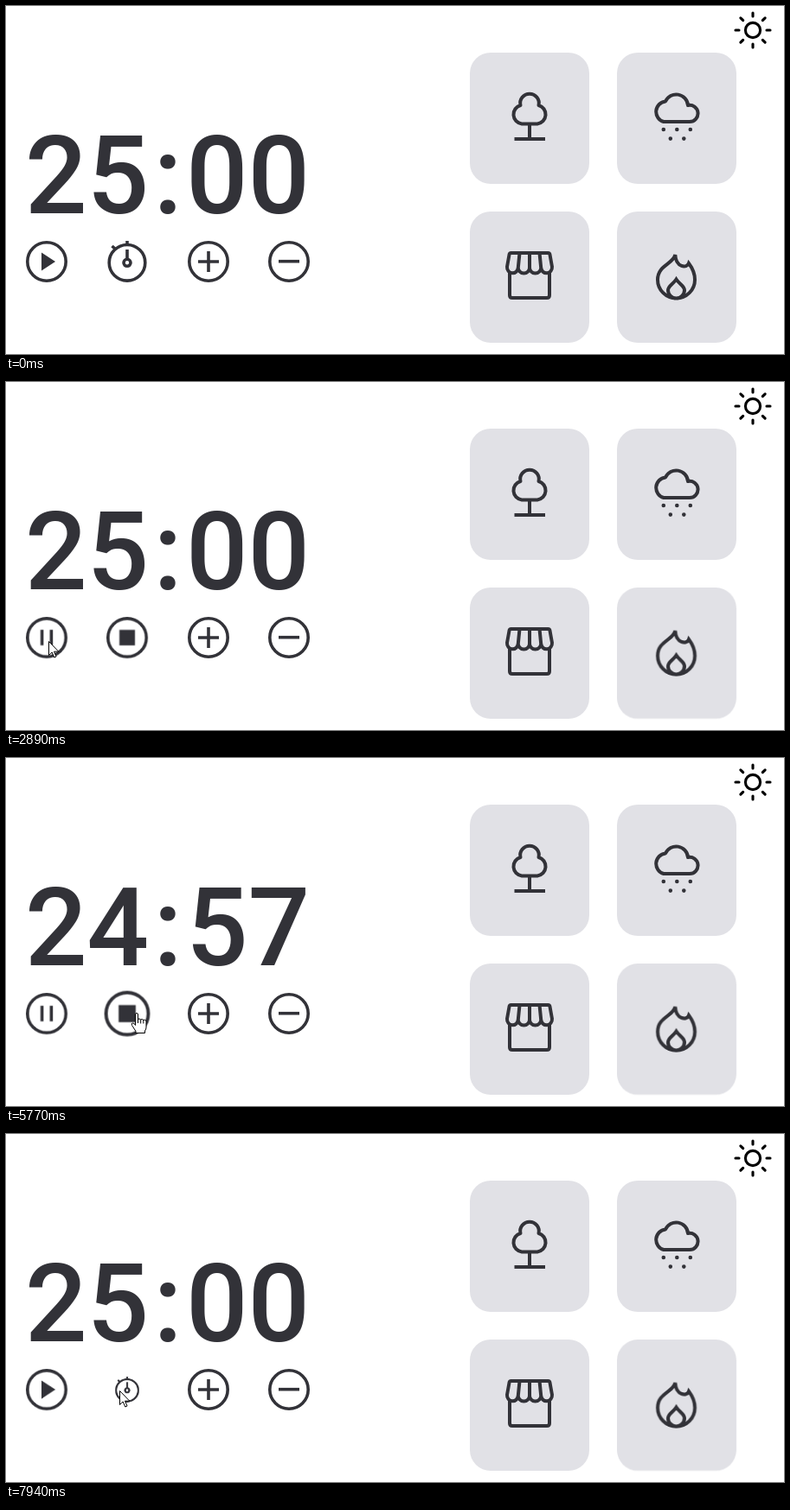
Animation of 899x403 px, one loop 8 s. Source, as an HTML page:

```html
<!DOCTYPE html>
<html lang="en">
<head>
<meta charset="utf-8">
<title>Focus timer</title>
<style>
html, body { margin: 0; width: 100%; height: 100%; overflow: hidden; background: #fff; }
svg { display: block; width: 899px; height: 403px; }
text { font: 500 126px Roboto, sans-serif; fill: #323238; }

.line { fill: none; stroke: #323238; stroke-width: 4; stroke-linejoin: round; }
.thin { stroke-width: 3.6; stroke-linejoin: miter; }
.solid { fill: #323238; }
.card { fill: #e1e1e6; }
.sun { fill: none; stroke: #000; stroke-width: 3.1; stroke-linecap: round; }
.pointer { fill: #fff; stroke: #000; stroke-linejoin: round; }
.beam { fill: none; stroke: #fff; mix-blend-mode: difference; }

/* One shared 8 s loop */
.loop { animation: 8s linear infinite; }
.step { animation: 8s step-end infinite; }

/* Counter */
.s00 { animation-name: s00; }
.s59 { animation-name: s59; }
.s58 { animation-name: s58; }
.s57 { animation-name: s57; }
.s56 { animation-name: s56; }
@keyframes s00 { 0%, 98.5% { opacity: 1 } 46.875%, 100% { opacity: 0 } }
@keyframes s59 { 0%, 59.5%, 100% { opacity: 0 } 46.875% { opacity: 1 } }
@keyframes s58 { 0%, 72%, 100% { opacity: 0 } 59.5% { opacity: 1 } }
@keyframes s57 { 0%, 84.625%, 100% { opacity: 0 } 72% { opacity: 1 } }
@keyframes s56 { 0%, 98.5%, 100% { opacity: 0 } 84.625% { opacity: 1 } }

/* Swapped button icons */
.play { animation-name: play; }
.pause { animation-name: pause; }
.watch { animation-name: watch; }
.stop { animation-name: stop; }
@keyframes play { 0%, 85.5%, 100% { opacity: 1 } 33.375% { opacity: 0 } }
@keyframes pause { 0%, 85.5%, 100% { opacity: 0 } 33.375% { opacity: 1 } }
@keyframes watch { 0%, 98.5%, 100% { opacity: 1 } 33.375% { opacity: 0 } }
@keyframes stop { 0%, 98.5%, 100% { opacity: 0 } 33.375% { opacity: 1 } }

/* Hover growth and pop-in */
.first { animation-name: first; }
.second { animation-name: second; }
@keyframes first {
  0%, 21.5% { transform: scale(1) }
  23.75%, 33.374% { transform: scale(1.1) }
  33.375% { transform: scale(0) }
  35.875%, 45.5% { transform: scale(1) }
  47.25%, 51.625% { transform: scale(1.1) }
  53.375%, 79.125% { transform: scale(1) }
  81%, 85.499% { transform: scale(1.1) }
  85.5% { transform: scale(0) }
  88%, 100% { transform: scale(1) }
}
@keyframes second {
  0%, 33.374% { transform: scale(1) }
  33.375% { transform: scale(0) }
  35.875%, 56.875% { transform: scale(1) }
  59.25%, 76.25% { transform: scale(1.1) }
  78%, 92.125% { transform: scale(1) }
  94.25%, 98.499% { transform: scale(1.1) }
  98.5% { transform: scale(0) }
  99.25% { transform: scale(.61) }
  100% { transform: scale(.95) }
}
.fire { transform-origin: 775px 314px; animation-name: fire; }
@keyframes fire {
  0%, 5.7% { transform: scale(1) }
  6.625%, 8.5% { transform: scale(1.05) }
  10.375%, 100% { transform: scale(1) }
}

/* Mouse */
.mouse { animation-name: mouse; }
@keyframes mouse {
  0%, 6% { transform: translate(775px, 380px) }
  6.625%, 8.4% { transform: translate(693px, 300px) }
  8.625% { transform: translate(676px, 286px) }
  10.625% { transform: translate(470px, 222px) }
  12.5% { transform: translate(345px, 214px) }
  15% { transform: translate(215px, 212px) }
  16.625% { transform: translate(150px, 214px) }
  18.375% { transform: translate(102px, 225px) }
  19.25% { transform: translate(84px, 245px) }
  20% { transform: translate(72px, 262px) }
  21.75% { transform: translate(60px, 276px) }
  23.5% { transform: translate(51px, 296px) }
  24.375% { transform: translate(49px, 299px) }
  26.125%, 45.125% { transform: translate(49px, 300px) }
  46.25% { transform: translate(55px, 300px) }
  50% { transform: translate(70px, 298px) }
  51.875% { transform: translate(78px, 300px) }
  55.25% { transform: translate(106px, 298px) }
  56.125% { transform: translate(108px, 298px) }
  57.5% { transform: translate(130px, 296px) }
  58.875% { transform: translate(148px, 295px) }
  61.375%, 74.5% { transform: translate(151px, 295px) }
  76.625% { transform: translate(115px, 298px) }
  79.125% { transform: translate(72px, 298px) }
  81.375%, 85.5% { transform: translate(52px, 297px) }
  88% { transform: translate(58px, 296px) }
  89.625% { transform: translate(73px, 296px) }
  91.625% { transform: translate(113px, 292px) }
  94.125% { transform: translate(128px, 285px) }
  95%, 97.4% { transform: translate(129px, 284px) }
  97.5%, 98.4% { transform: translate(126px, 284px) }
  99.25%, 100% { transform: translate(131px, 297px) }
}
.arrow { animation-name: arrow; }
.beam { animation-name: beam; }
.hand { animation-name: hand; }
@keyframes arrow {
  0%, 12.5%, 21%, 45.625%, 57.25%, 79.125%, 87.25%, 91.625%, 100% { opacity: 0 }
  5.875%, 19.125%, 33.375%, 51.875%, 76.625%, 85.5%, 89.875%, 98.5% { opacity: 1 }
}
@keyframes beam { 0%, 19.125%, 100% { opacity: 0 } 12.5% { opacity: 1 } }
@keyframes hand {
  0%, 33.375%, 51.875%, 76.625%, 85.5%, 89.875%, 98.5%, 100% { opacity: 0 }
  21%, 45.625%, 57.25%, 79.125%, 87.25%, 91.625% { opacity: 1 }
}
</style>
</head>
<body>
<svg viewBox="0 0 899 403">
  <defs>
    <circle id="ring" class="line thin" r="22.2"/>
    <rect id="tile" class="card" width="138" height="152" rx="24"/>
    <path id="rays" d="M0-20V-16M0 16V20"/>
  </defs>
  <rect width="899" height="403" fill="#fff"/>

  <g class="sun" transform="translate(863 28)">
    <circle r="8.6"/>
    <use href="#rays"/>
    <use href="#rays" transform="rotate(45)"/>
    <use href="#rays" transform="rotate(90)"/>
    <use href="#rays" transform="rotate(135)"/>
  </g>

  <!-- Sound cards -->
  <g>
    <use href="#tile" x="536" y="54"/>
    <path class="line" d="M596 136.5A11 11 0 0 1 594.5 115A10.8 10.8 0 1 1 615.5 115A11 11 0 0 1 614 136.5ZM605 137V154M587.5 154H623"/>
  </g>
  <g>
    <use href="#tile" x="706" y="54"/>
    <path class="line" d="M760 134A12 12 0 0 1 762 110.5A13.6 13.6 0 0 1 788 115A9.6 9.6 0 1 1 790 134Z"/>
    <path class="line" stroke-linecap="round" style="stroke-width:4.6" d="M759.8 143h.01M775.3 143h.01M790.8 143h.01M767.8 153.6h.01M783.3 153.6h.01"/>
  </g>
  <g>
    <use href="#tile" x="536" y="238"/>
    <path class="line" d="M583.5 286H626.5Q628 286 628.4 287.5L631 302A6.4 6.8 0 0 1 618.2 303A6.6 6.6 0 0 1 605 303A6.6 6.6 0 0 1 591.8 303A6.4 6.8 0 0 1 579 302L581.6 287.5Q582 286 583.5 286ZM593.5 286L591.8 303M605 286V303M616.5 286L618.2 303M582 308V335Q582 338 585 338H625Q628 338 628 335V308"/>
  </g>
  <g class="loop fire">
    <use href="#tile" x="706" y="238"/>
    <path class="line" style="stroke-linejoin:miter" d="M773.3 288C771 299 753 300 753 317A21.5 21.5 0 0 0 796 317C796 309 792 302 789 298C787 304 774 303 773.3 288ZM774.5 316.5C771 322 765 324 765 329A9.5 9.5 0 0 0 784 329C784 324 778 322 774.5 316.5Z"/>
  </g>

  <!-- Clock -->
  <text x="187" y="240" text-anchor="middle">:</text>
  <g class="step s00"><text x="22" y="240">25</text><text x="208" y="240">00</text></g>
  <g class="step s59"><text x="22" y="240">24</text><text x="208" y="240">59</text></g>
  <g class="step s58"><text x="22" y="240">24</text><text x="208" y="240">58</text></g>
  <g class="step s57"><text x="22" y="240">24</text><text x="208" y="240">57</text></g>
  <g class="step s56"><text x="22" y="240">24</text><text x="208" y="240">56</text></g>

  <!-- Controls -->
  <g transform="translate(47 296)"><g class="loop first">
    <use href="#ring"/>
    <path class="solid step play" d="M-6-10.5V10.5L10 0Z"/>
    <path class="line thin step pause" d="M-5.4-9V9M5.4-9V9"/>
  </g></g>
  <g transform="translate(140 296)"><g class="loop second">
    <g class="step watch">
      <path class="line thin" d="M0-24V-19M-17.5-18L-13-14M0-14V-3"/>
      <circle class="line thin" cy="1.3" r="20.8"/>
      <circle class="line thin" cy="1.3" r="4"/>
    </g>
    <g class="step stop">
      <use href="#ring"/>
      <rect class="solid" x="-9" y="-9" width="18" height="18"/>
    </g>
  </g></g>
  <g transform="translate(234 296)">
    <use href="#ring"/>
    <path class="line thin" d="M-12 0H12M0-12V12"/>
  </g>
  <g transform="translate(327 296)">
    <use href="#ring"/>
    <path class="line thin" d="M-12-.3H12"/>
  </g>

  <g class="loop mouse">
    <path class="pointer step arrow" d="M.5.5V16.5L4.2 13L6.8 19L9 18L6.5 12.2H11.8Z"/>
    <path class="step beam" d="M-3-7.5H-1Q0-7.5 0-6.5V6.5Q0 7.5-1 7.5H-3M3-7.5H1Q0-7.5 0-6.5M0 6.5Q0 7.5 1 7.5H3"/>
    <path class="pointer step hand" d="M-1.5 14V2Q-1.5.5 0 .5T1.5 2V8q0-1 1.5-1t1.7 1.5q0-1 1.5-1t1.6 1.5q.2-1 1.7-.7t1.5 2V17q0 2-1.5 4V23.5H-1V21.5L-5.5 14.5Q-6.5 12-4.5 12T-1.5 14.5ZM1.5 8V12M4.7 8.5V12.5M7.8 9V12.5"/>
  </g>
</svg>
</body>
</html>
```
